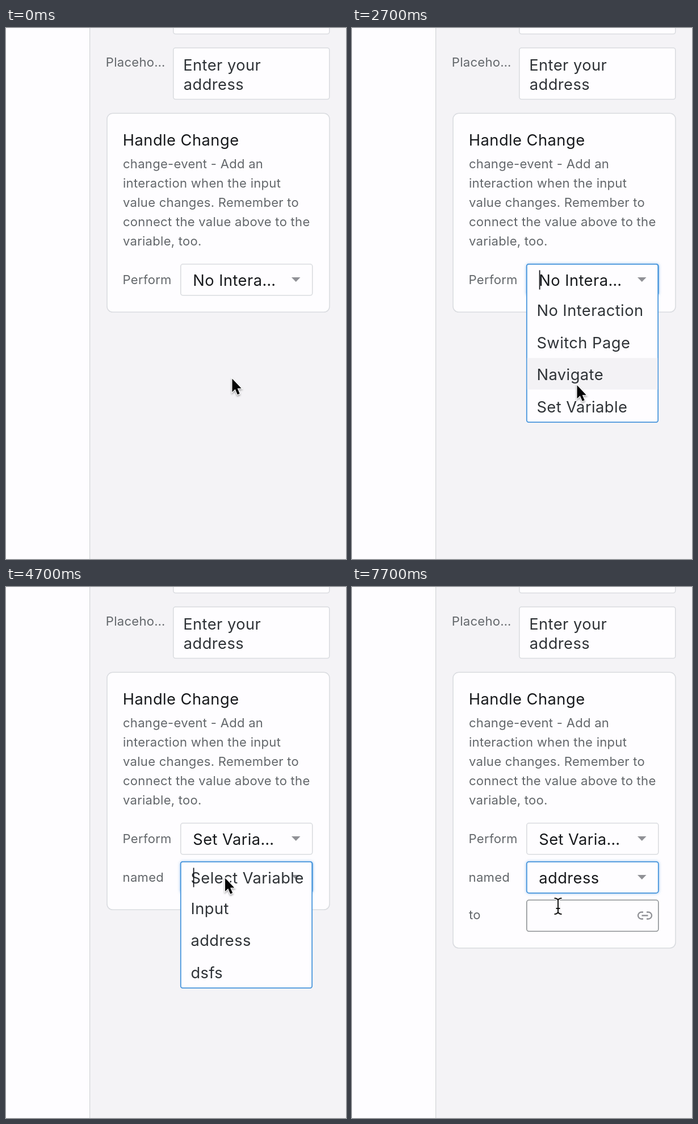
An HTML page for the animation above (8000 ms loop, 599 px wide and 935 px high).

```html
<!DOCTYPE html>
<html lang="en">
<head>
<meta charset="utf-8">
<title>Handle Change</title>
<style>
  html, body { margin: 0; width: 100%; height: 100%; overflow: hidden; background: #fefdff; }
  svg { display: block; }
  text {
    font: 27.3px Inter, sans-serif;
    font-optical-sizing: none;
    letter-spacing: .45px;
    fill: #2f3337;
    white-space: pre;
  }
  .small { font-size: 22.1px; letter-spacing: .25px; fill: #63676b; }
  .dark { fill: #17191c; }
  .box { fill: #fefdff; stroke: #dadce0; stroke-width: 1.6; }
  .hover { stroke: #8d9194; }
  .focus { stroke: #4795dc; stroke-width: 1.8; filter: drop-shadow(0 0 2.5px rgba(71, 149, 220, .55)); }
  .list { fill: #fefdff; stroke: #4795dc; stroke-width: 1.8; }
  .mark { fill: #f3f2f5; }
  .arrow { fill: #909196; }
  .caret { fill: #17191c; }
  .hide { display: none; }
  #pointer { filter: drop-shadow(0 2px 1.5px rgba(0, 0, 0, .35)); }
</style>
</head>
<body>
<svg width="599" height="935" viewBox="0 0 599 935">
  <defs>
    <path id="chevron" class="arrow" d="M503 0h15.5l-7.75 8z"/>
    <path id="beamPath" d="M-6.5-14q5 0 6.5 3.5q1.500-3.500 6.500-3.500M0-11v22M-6.5 14q5 0 6.5-3.5q1.500 3.500 6.500 3.500M-3.500 4h7"/>
  </defs>

  <rect width="599" height="935" fill="#fefdff"/>
  <rect x="147" width="452" height="935" fill="#f4f3f6"/>
  <rect x="147" width="1.2" height="935" fill="#d3d5d8"/>

  <rect class="box" x="294.8" y="-40" width="275" height="50.5" rx="4"/>
  <text class="small" x="175.8" y="68">Placeho…</text>
  <rect class="box" x="294.8" y="35" width="275" height="90.5" rx="4"/>
  <text x="312.2" y="75.2">Enter your</text>
  <text x="312.7" y="109.2">address</text>

  <rect id="card" class="box" x="178" y="150.3" width="392" height="350" rx="10"/>
  <text class="dark" x="205.8" y="207.2">Handle Change</text>
  <g id="about"></g>

  <text class="small" x="205.6" y="450.5">Perform</text>
  <rect id="action" class="box" x="307.8" y="415.8" width="232" height="55" rx="4"/>
  <use href="#chevron" y="439"/>
  <text id="actionText" class="dark" x="329.2" y="454.2"></text>

  <g id="nameRow">
    <text class="small" x="205.6" y="518.5">named</text>
    <rect id="name" class="box" x="307.8" y="483.8" width="232" height="55" rx="4"/>
  </g>

  <g id="toRow">
    <text class="small" x="206" y="584.5">to</text>
    <rect id="to" class="box" x="307.8" y="551.3" width="232" height="55" rx="4"/>
    <path d="M513 572.5h-3a6 6 0 0 0 0 12h3M519 572.5h3a6 6 0 0 1 0 12h-3M510.5 578.5h11"
      fill="none" stroke="#909196" stroke-width="2.3"/>
  </g>

  <g id="menu">
    <rect id="list" class="list" x="307.8" width="231.4" rx="3.5"/>
    <rect id="mark" class="mark" x="308.7" width="229.6" height="55.5"/>
    <g id="items"></g>
    <g id="menuTop">
      <use href="#chevron" y="439"/>
      <text class="dark" x="329.2" y="454.2">No Intera…</text>
    </g>
  </g>
  <g id="nameTop">
    <use href="#chevron" y="507"/>
    <text id="nameText" y="522.2"></text>
  </g>
  <rect id="caret" class="caret" width="1.8" height="34"/>

  <path id="pointer" d="M1.5 2.5v23.5l5.3-5 4 9.5 3.9-1.7-4-9.2h7z"
    fill="#050505" stroke="#fff" stroke-width="2.4" paint-order="stroke"/>
  <g id="beam" fill="none">
    <use href="#beamPath" stroke="#fff" stroke-width="4.5"/>
    <use href="#beamPath" stroke="#111" stroke-width="2"/>
  </g>
</svg>
<script>
const LOOP = 8000, STEP = 100, ROW = 56.5, WRAP = 195, LINE = 34, ITEM_X = 325.4;
const $ = id => document.getElementById(id);
const show = (id, on) => $(id).classList.toggle('hide', !on);
const set = (id, attrs) => { for (const k in attrs) $(id).setAttribute(k, attrs[k]); };
const between = (t, a, b) => t >= a && t < b;

function addText(parent, text, x, y, cls = '') {
  const el = document.createElementNS('http://www.w3.org/2000/svg', 'text');
  el.setAttribute('x', x);
  el.setAttribute('y', y);
  el.setAttribute('class', cls);
  el.textContent = text;
  parent.append(el);
  return el;
}

['change-event - Add an', 'interaction when the input', 'value changes. Remember to',
 'connect the value above to the', 'variable, too.']
  .forEach((line, i) => addText($('about'), line, 206, 247 + i * LINE, 'small'));

// Pointer path: time, x, y
const path = [
  [500, 397, 615], [1000, 395, 447], [2200, 395, 447], [2900, 395, 671],
  [3400, 395, 671], [3500, 395, 670], [4100, 384.5, 510], [6900, 384.5, 510],
  [7100, 379, 530], [7200, 361, 553], [7500, 363, 562]
];

function pointerAt(t) {
  const i = path.findIndex(p => p[0] > t);
  if (i < 0) return path[path.length - 1].slice(1);
  if (i === 0) return path[0].slice(1);
  const [t0, x0, y0] = path[i - 1], [t1, x1, y1] = path[i];
  const p = (t - t0) / (t1 - t0), e = p * p * (3 - 2 * p);
  return [x0 + (x1 - x0) * e, y0 + (y1 - y0) * e];
}

// Times at which each letter is typed
const keys = [5300, 5800, 5900, 6100, 6200, 6400, 6500];
const typedAt = t => 'address'.slice(0, keys.filter(k => t >= k).length);

function menuItems(t, typed) {
  if (t < 3100) return ['No Interaction', 'Switch Page', 'Navigate', 'Set Variable'];
  if (!typed) return ['Input', 'address', 'dsfs'];
  if (typed === 'address') return ['address'];
  const create = `Create "${typed}"`;
  return typed === 'a' ? ['Input', 'address', create] : ['address', create];
}

function drawMenu(t, typed, hoverY) {
  const first = t < 3100;
  const top = first ? 415.8 : 483.8, start = first ? 469 : 537.5;
  const items = menuItems(t, typed), group = $('items');
  let bottom = start + items.length * ROW;
  group.replaceChildren();
  items.forEach((label, i) => {
    const y = start + 38 + i * ROW;
    const el = addText(group, label, ITEM_X, y);
    if (label.startsWith('Create') && el.getComputedTextLength() > WRAP) {
      el.textContent = 'Create';
      addText(group, label.slice(7), ITEM_X, y + LINE);
      bottom += LINE;
    }
  });
  set('list', { y: top, height: bottom - top - .9 });
  const row = Math.floor((hoverY - start) / ROW);
  const marked = row >= 0 && row < items.length;
  show('mark', marked);
  if (marked) set('mark', { y: start + row * ROW - .9 });
  show('menuTop', first);
}

function draw(t) {
  const typed = typedAt(t);
  const [x, y] = pointerAt(t), hoverY = pointerAt(t - STEP)[1];
  const over = top => between(hoverY, top, top + 56);
  const hasName = t >= 3100, hasTo = t >= 7500;

  set('card', { height: hasTo ? 485.5 : hasName ? 418 : 350 });
  show('nameRow', hasName);
  show('nameTop', hasName);
  show('toRow', hasTo);

  const style = (id, focus, hover) =>
    set(id, { class: 'box' + (focus ? ' focus' : hover ? ' hover' : '') });
  style('action', between(t, 1400, 4600), over(415));
  style('name', t >= 4600, over(483));
  style('to', false, t >= 7700);

  $('actionText').textContent = hasName ? 'Set Varia…' : 'No Intera…';
  $('nameText').textContent = typed || 'Select Variable';
  const nameX = typed ? 329.2 : ITEM_X;
  set('nameText', { x: nameX, class: typed ? 'dark' : '' });

  const open = between(t, 1500, 3100) || between(t, 4700, 7500);
  show('menu', open);
  if (open) drawMenu(t, typed, hoverY);

  const inAction = between(t, 1500, 1900) || between(t, 2400, 2900);
  const inName = between(t, 4700, 5200) || between(t, 5300, 7000);
  show('caret', inAction || inName);
  const caretX = typed ? nameX + $('nameText').getComputedTextLength() - .5 : 329.7;
  set('caret', { x: caretX, y: inAction ? 426.5 : 494.5 });

  const beam = t >= 7600;
  show('beam', beam);
  show('pointer', !beam && !between(t, 5300, 7000));
  set(beam ? 'beam' : 'pointer', { transform: `translate(${x} ${y})` });
}

const began = performance.now();
function tick() {
  const t = (performance.now() - began) % LOOP;
  draw(Math.floor(t / STEP) * STEP);
  requestAnimationFrame(tick);
}
tick();
</script>
</body>
</html>
```
